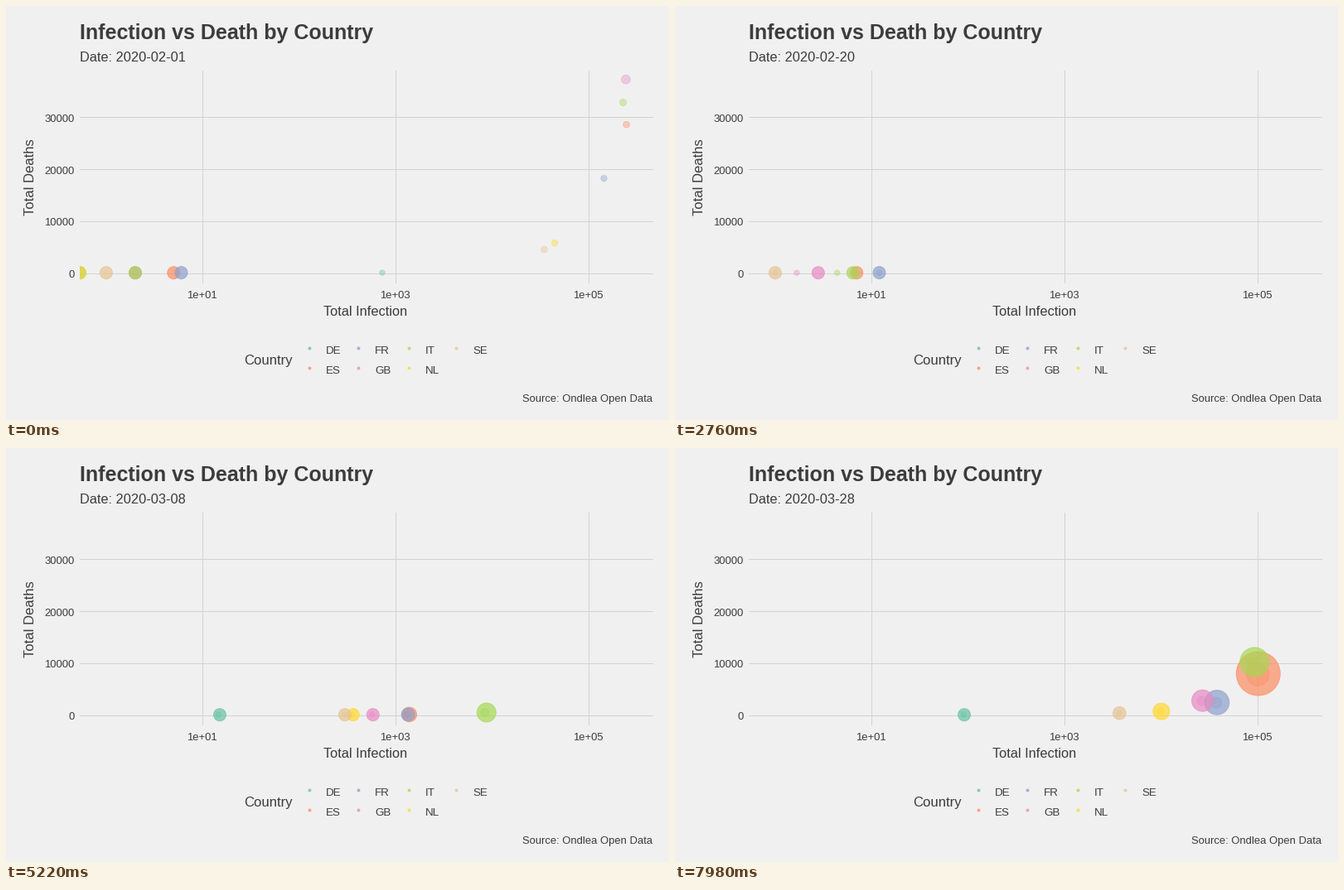
These frames come from a looping animation (800x500 px, 8000 ms). A matplotlib script:

```python
import numpy as np
import matplotlib.pyplot as plt
from matplotlib.animation import FuncAnimation
from matplotlib.colors import to_rgba
from matplotlib.patches import Rectangle

W, H, DPI = 800, 500, 100
FRAMES, INTERVAL = 250, 32      # 8 s loop
TICK = 30                       # the plot advances one step every 30 ms
STEPS_PER_DAY = 4.7337
LAST_DAY = 105                  # where the trails of the first step come from

BG, GRID, INK = "#f0f0f0", "#d2d2d2", "#3c3c3c"
LEFT, RIGHT, TOP, BOTTOM = 89, 780, 78, 334
POINT_ALPHA = 0.7
EDGE = 1.0

KEY_STEPS = np.round(np.arange(60) * STEPS_PER_DAY)


def px(value):
    return value * 72 / DPI


def x_pos(log_cases):
    return 120.95 + 116.35 * log_cases


def y_pos(deaths):
    return 322.2 - 62.7 * deaths / 10000


class Country:
    """Keyed (day, value) curves for cases, deaths and point radius."""

    def __init__(self, name, color, cases, deaths, radii):
        self.name, self.color = name, color
        self.days, values = np.array(cases, float).T
        self.logs = np.log10(values)
        self.deaths = np.array(deaths, float).T
        self.radii = np.array(radii, float).T

    def at(self, step):
        """Position and radius at a step, or None while undefined."""
        if step < 0:
            day = LAST_DAY
        else:
            day = np.interp(step, KEY_STEPS, np.arange(len(KEY_STEPS)))
        if day >= self.days[0]:
            x = x_pos(np.interp(day, self.days, self.logs))
        elif step in KEY_STEPS:
            x = LEFT            # log of zero sits on the panel edge
        else:
            return None
        y = y_pos(np.interp(day, *self.deaths))
        return x, y, np.interp(day, *self.radii)


COUNTRIES = [
    Country("DE", "#66c2a5",
            [(26, 1), (27, 1), (28, 3), (34, 4), (35, 6), (36, 13), (37, 15.6),
             (48, 50), (49, 52.5), (57, 97), (105, 728)],
            [(57, 0), (105, 20)],
            [(0, 8), (105, 8)]),
    Country("ES", "#fc8d62",
            [(0, 5), (8, 5), (10, 7), (20, 7), (22, 8), (25, 14), (26, 20),
             (27, 39), (30, 130), (36, 1150), (37, 1460), (42, 7000),
             (48, 33700), (49, 36300), (56, 101200), (57, 106000),
             (105, 248000)],
            [(30, 0), (36.8, 60), (48.8, 2180), (56.2, 7930), (57, 8650),
             (105, 28550)],
            [(30, 8), (36.8, 9.3), (48.8, 18), (51, 21), (55, 28), (56, 31),
             (57, 11), (105, 9.5)]),
    Country("FR", "#8da0cb",
            [(0, 6), (5, 6), (7, 11), (14, 11), (15, 12), (23, 12), (24, 18),
             (25, 38), (26, 57), (27, 100), (29, 130), (36, 1126), (37, 1412),
             (48, 12612), (49, 14459), (56, 37575), (57, 40174),
             (105, 145000)],
            [(36, 20), (48.8, 560), (56, 2317), (57, 2611), (105, 18180)],
            [(34, 8), (36.8, 8.5), (48.8, 12), (56.2, 15.3), (105, 9)]),
    Country("GB", "#e78ac3",
            [(0, 2), (4, 2), (7, 9), (8, 8), (12, 4), (18, 1), (19, 1),
             (20, 13), (25, 23), (26, 37), (27, 44.5), (36, 530), (37, 598),
             (48, 8200), (49, 8700), (56, 26600), (57, 28600),
             (105, 245000)],
            [(36, 0), (44, 80), (48.8, 480), (56.2, 2720), (57, 3200),
             (105, 37240)],
            [(36.8, 8), (48.8, 10.5), (56.2, 13.5), (105, 12.7)]),
    Country("IT", "#a6d854",
            [(0, 2), (5, 2), (6, 3), (19, 3), (20, 20), (21, 79), (22, 150),
             (24, 320), (26, 650), (27, 888), (29, 1694), (34, 4636),
             (36, 7375), (37, 9172), (40, 15113), (45, 31506), (48, 47021),
             (51, 63927), (56, 92472), (57, 97689), (105, 229500)],
            [(24, 0), (29, 34), (36, 366), (37, 463), (40, 1016), (45, 2503),
             (48, 4032), (49, 4825), (56, 10023), (57, 10779), (105, 32800)],
            [(24, 8), (27, 8.5), (34.2, 10), (36.8, 12), (40, 13.5),
             (45.6, 16.5), (48.8, 18), (51.4, 16), (56.2, 18), (105, 9.8)]),
    Country("NL", "#ffd92f",
            [(26, 1), (27, 6), (31, 55), (36, 330), (37, 372), (48, 3400),
             (49, 3655), (56, 9900), (57, 10900), (105, 44700)],
            [(40, 0), (48.8, 150), (56.2, 650), (57, 720), (105, 5740)],
            [(36.8, 8), (48.8, 8.4), (56.2, 10.5), (105, 9.3)]),
    Country("SE", "#e5c494",
            [(0, 1), (25, 1), (26, 3), (27, 11), (30, 30), (36, 280),
             (37, 303), (48, 1770), (49, 1835), (56, 3680), (57, 3850),
             (105, 34900)],
            [(44, 0), (56.2, 320), (57, 360), (105, 4470)],
            [(48, 8), (56.2, 8.3), (105, 9.5)]),
]

# Trail layers, back to front: steps behind, size factor, opacity.
LAYERS = [(2, 0, 0.12), (1, 0.46, 0.38), (0, 1, POINT_ALPHA)]

plt.rcParams["font.family"] = "Liberation Sans"
fig = plt.figure(figsize=(W / DPI, H / DPI), dpi=DPI, facecolor=BG)
ax = fig.add_axes([0, 0, 1, 1])
ax.set_axis_off()
ax.set_autoscale_on(False)
ax.set_xlim(0, W)
ax.set_ylim(H, 0)


def label(x, y, text, size, **kw):
    return ax.text(x, y, text, fontsize=px(size), color=INK,
                   va="baseline", **kw)


# Grid and tick labels
for k in range(4):
    y = 322.5 - 62.7 * k
    ax.plot([LEFT, RIGHT], [y, y], color=GRID, lw=px(1), zorder=1)
    label(82.5, round(y + 5.6), f"{10000 * k}", 13, ha="right")
for power in (1, 3, 5):
    x = x_pos(power)
    ax.plot([x, x], [TOP, BOTTOM], color=GRID, lw=px(1), zorder=1)
    label(x - 0.5, 353, f"1e+{power:02d}", 13, ha="center")

# Titles
label(89, 40, "Infection vs Death by Country", 25, weight="bold")
subtitle = label(89, 67, "", 16.4)
label(434, 374, "Total Infection", 16.4, ha="center")
label(34.5, 206.5, "Total Deaths", 16.6, ha="center", rotation=90,
      rotation_mode="anchor")
label(780, 478, "Source: Ondlea Open Data", 13, ha="right")

# Legend, filled column by column
label(287, 433, "Country", 16.6)
for i, c in enumerate(COUNTRIES):
    col, row = divmod(i, 2)
    x, y = (366, 425, 486, 543)[col], 413 + 24 * row
    shade = to_rgba(c.color, POINT_ALPHA)
    ax.scatter([x], [y], s=px(3) ** 2, facecolors=[shade],
               edgecolors=[shade], linewidths=px(EDGE))
    label((385.5, 445, 505.5, 563.5)[col], y + 7, c.name, 13.4)

dots = ax.scatter([], [], linewidths=px(EDGE), zorder=3)
dots.set_clip_path(Rectangle((LEFT, TOP), RIGHT - LEFT, BOTTOM - TOP,
                             transform=ax.transData))


def update(frame):
    step = (frame * INTERVAL + 24) // TICK
    date = np.datetime64("2020-02-01") + int(step / STEPS_PER_DAY)
    subtitle.set_text(f"Date: {date}")

    places, sizes, shades = [], [], []
    for lag, factor, alpha in LAYERS:
        for c in COUNTRIES:
            state = c.at(step - lag)
            if state is None:
                continue
            x, y, r = state
            places.append((x, y))
            sizes.append(px(max(2 * r * factor - EDGE, 0.6)) ** 2)
            shades.append(to_rgba(c.color, alpha))
    dots.set_offsets(places)
    dots.set_sizes(np.array(sizes), DPI)
    dots.set_facecolors(shades)
    dots.set_edgecolors(shades)
    return dots, subtitle


anim = FuncAnimation(fig, update, frames=FRAMES, interval=INTERVAL,
                     init_func=lambda: update(0), repeat=True,
                     repeat_delay=0, blit=False)
plt.show()
```
